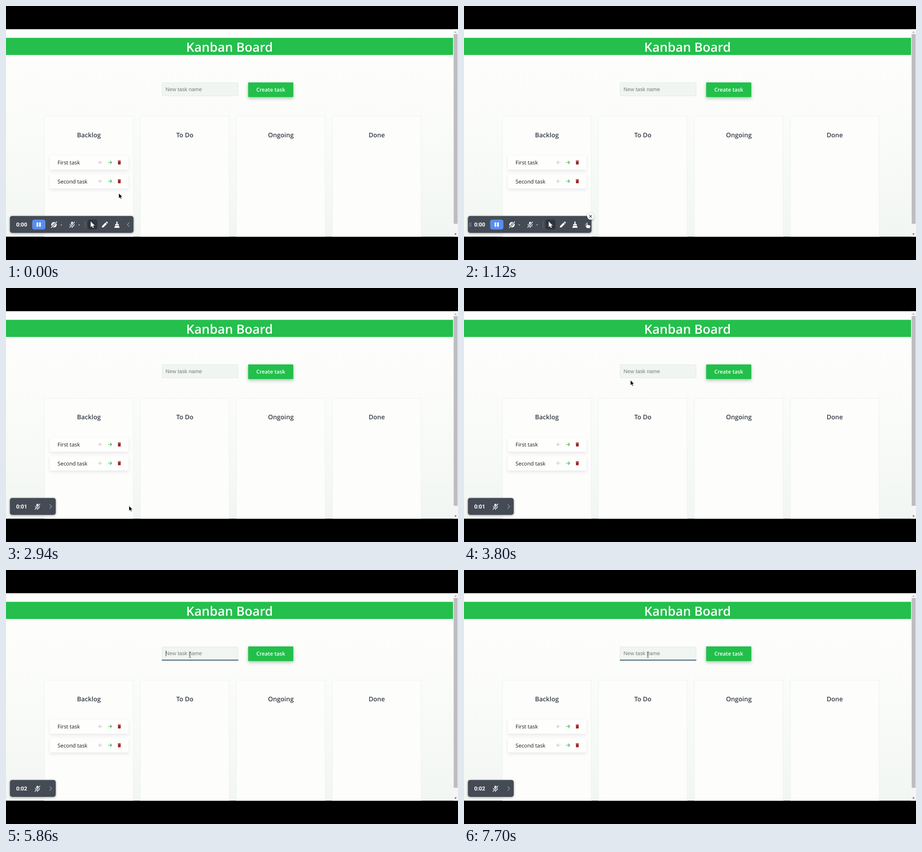
Write an HTML page that moves like this. It is 998x561 px and loops after 8 s.

```html
<!DOCTYPE html>
<html lang="en">
<head>
<meta charset="utf-8">
<title>Kanban Board</title>
<style>
  html, body { margin: 0; width: 100%; height: 100%; overflow: hidden; background: #000; }
  svg { display: block; }
  text { font-family: "Open Sans", sans-serif; text-rendering: geometricPrecision; }
  .middle { text-anchor: middle; font-weight: 600; }
  .title { font-size: 28px; fill: #fff; }
  .button { font-size: 11.67px; fill: #fff; }
  .heading { font-size: 14px; fill: #363c47; }
  .task { font-size: 11.8px; fill: #1c1c1c; }
  .placeholder { font: 11.7px "Liberation Sans", sans-serif; fill: #777c7b; }
  .timer { font: 600 12.2px Roboto, sans-serif; fill: #fff; }
  .line { fill: none; stroke-linecap: round; stroke-linejoin: round; }
</style>
</head>
<body>
<svg width="998" height="561" viewBox="0 0 998 561">
  <defs>
    <linearGradient id="page" x2="0" y2="1">
      <stop offset="0" stop-color="#fefffd"/>
      <stop offset=".35" stop-color="#fcfdfa"/>
      <stop offset="1" stop-color="#f2f6f3"/>
    </linearGradient>
    <filter id="cardShadow" x="-10%" y="-40%" width="120%" height="200%">
      <feDropShadow dx="0" dy="3" stdDeviation="3" flood-color="#505078" flood-opacity=".12"/>
    </filter>
    <filter id="buttonShadow" x="-20%" y="-40%" width="140%" height="200%">
      <feDropShadow dx="0" dy="3" stdDeviation="3.5" flood-color="#164a28" flood-opacity=".32"/>
    </filter>
    <filter id="barShadow" x="-10%" y="-30%" width="120%" height="170%">
      <feDropShadow dx="0" dy="1" stdDeviation="2" flood-opacity=".4"/>
    </filter>
    <clipPath id="screen"><rect y="51.3" width="998" height="458.2"/></clipPath>

    <g id="arrow" class="line" stroke-width="1.1">
      <path d="M-3.5 0H4M.7-3.3L4 0 .7 3.3"/>
    </g>
    <g id="trash" fill="#9c2226">
      <path d="M-3.5-4H-1.5L-1-4.6H1L1.5-4H3.5V-2.8H-3.5ZM-3-2.2H3V3.7Q3 4.6 2.1 4.6H-2.1Q-3 4.6-3 3.7Z"/>
    </g>
    <g id="camOff">
      <circle r="6" fill="#fff"/>
      <circle r="2.4" fill="#454b54"/>
      <path class="line" stroke="#454b54" stroke-width="3.4" d="M6-6.5L-6 6.5"/>
      <path class="line" stroke="#fff" stroke-width="1.4" d="M6-6.5L-6 6.5"/>
    </g>
    <g id="micOff">
      <rect x="-2.3" y="-6.5" width="4.6" height="8.5" rx="2.3" fill="#fff"/>
      <path class="line" stroke="#fff" stroke-width="1.3" d="M-4.5-1Q-4.5 4 0 4T4.5-1M0 4V6.5"/>
      <path class="line" stroke="#454b54" stroke-width="3" d="M5.5-6L-5.5 6"/>
      <path class="line" stroke="#fff" stroke-width="1.3" d="M5.5-6L-5.5 6"/>
    </g>
    <path id="caretDown" fill="#a9adb3" d="M-2.3-1H2.3L0 1.7Z"/>
  </defs>

  <g clip-path="url(#screen)">
    <rect y="51" width="998" height="459" fill="url(#page)"/>
    <rect y="70.3" width="987" height="37.9" fill="#24bf4c"/>
    <text class="middle title" x="493.5" y="100.5">Kanban Board</text>

    <rect x="344.5" y="169.5" width="168" height="29" rx="1" fill="#f0f5f2" stroke="#e1eae6"/>
    <text class="placeholder" x="352.3" y="188">New task name</text>
    <g id="focus">
      <path d="M344 199.2H513" stroke="#264b60" stroke-width="1.8"/>
      <path id="textCaret" d="M353.3 178V190.5" stroke="#222"/>
    </g>
    <rect x="534.6" y="168.8" width="99.8" height="32.4" rx="1.5" fill="#24bf4c" filter="url(#buttonShadow)"/>
    <text class="middle button" x="584.5" y="189">Create task</text>

    <g id="board"></g>

    <rect x="987" y="51" width="11" height="459" fill="#f5f5f6"/>
    <rect x="988.5" y="62" width="8.5" height="419" fill="#bdbdc1"/>
    <path d="M990 59L992.5 56 995 59Z" fill="#a3a3a3"/>
    <path d="M990 502.5L992.5 505.5 995 502.5Z" fill="#505050"/>

    <rect id="bar" x="8.6" y="463.8" height="37.2" rx="5" fill="#454b54" filter="url(#barShadow)"/>
    <text id="timer" class="timer" x="22.4" y="486.6"></text>
    <g id="wideTools">
      <rect x="57.7" y="471.7" width="29.3" height="22" rx="5" fill="#588df0"/>
      <path fill="#fff" d="M67.5 478h3.6v9.5h-3.6zM73.2 478h3.6v9.5h-3.6z"/>
      <use href="#camOff" x="106" y="483"/>
      <use href="#caretDown" x="122" y="483.5"/>
      <use href="#micOff" x="146" y="483"/>
      <use href="#caretDown" x="161.5" y="483.5"/>
      <path d="M174.5 475V490" stroke="#6a7078"/>
      <rect x="180" y="471.5" width="22" height="22" rx="5" fill="#30353c"/>
      <path fill="#fff" d="M187 476V488.3L189.8 485.7 191.8 490 193.8 489 191.9 484.9H196Z"/>
      <path fill="#fff" d="M211.5 489.5L212.3 485.7 219.7 478.3 222.7 481.3 215.3 488.7ZM220.6 477.4L221.8 476.3Q222.4 475.8 223 476.3L224.7 478Q225.2 478.6 224.7 479.2L223.6 480.4Z"/>
      <path fill="#fff" d="M243.8 476H246.2V481.5H249V484.2H241V481.5H243.8ZM240.7 485.2H249.3L250.8 490H247.7L247 487.5V490H239.2Z"/>
      <path class="line" stroke="#8e949b" stroke-width="1.4" d="M271.8 478.5L267.8 482.7 271.8 487"/>
      <g id="hoverTools">
        <path d="M12.5 478V487.5M15.3 478V487.5" stroke="#8e949b"/>
        <circle cx="279.5" cy="464.5" r="7.6" fill="#fff" filter="url(#barShadow)"/>
        <path class="line" stroke="#333" stroke-width="1.2" d="M276.8 461.8L282.2 467.2M282.2 461.8L276.8 467.2"/>
      </g>
    </g>
    <g id="smallTools">
      <use href="#micOff" x="69.5" y="483"/>
      <path class="line" stroke="#8e949b" stroke-width="1.4" d="M96.8 478.5L100.8 482.7 96.8 487"/>
    </g>

    <g id="pointer">
      <path id="arrowCursor" fill="#000" stroke="#fff" stroke-width=".8" d="M0 0V11.5L2.7 9.1 4.5 13 6.4 12.1 4.7 8.3H8.3Z"/>
      <path id="handCursor" fill="#fff" stroke="#222" stroke-width=".7" d="M-1.4 1Q0-1 1.3 1V5L7 6.3Q8 6.8 7.9 8L7 13H0L-4 8Q-4 6.5-2.8 6.7L-1.4 8Z"/>
      <path id="textCursor" class="line" stroke="#555" d="M-2-6.3Q0-6.3 0-5 0-6.3 2-6.3M0-5V5M-2 6.3Q0 6.3 0 5 0 6.3 2 6.3M-1 2H1"/>
    </g>
  </g>
</svg>
<script>
const LOOP = 8000;
const HOVER = 620, HAND = 840, COLLAPSE = 2380, TEXT = 4060, FOCUS = 5740;
const TICKS = [2660, 5460];
const BLINK = 1380;
const COLUMN_STEP = 211.9;

// Pointer hot spot: time, x, y
const PATH = [
  [0, 249, 413.5], [400, 249, 413.5], [1000, 271.5, 478], [1420, 271.5, 478],
  [1820, 271.5, 481], [3220, 271.5, 481], [3800, 367.5, 203.5], [4340, 406, 187]
];

const $ = id => document.getElementById(id);
const show = (id, visible) => { $(id).style.display = visible ? "" : "none"; };

const column = (name, i) => `
  <rect x="${85 + COLUMN_STEP * i}" y="243.5" width="196" height="280" fill="#fdfdfb" stroke="#ecf3f0"/>
  <text class="middle heading" x="${183 + COLUMN_STEP * i}" y="290">${name}</text>`;

const taskCard = (name, y) => `
  <rect x="97" y="${y - 15}" width="173" height="31" rx="2" fill="#fefefc" filter="url(#cardShadow)"/>
  <text class="task" x="113.8" y="${y + 4.6}">${name}</text>
  <use href="#arrow" transform="translate(209 ${y}) scale(-1 1)" stroke="#bfc1c1"/>
  <use href="#arrow" x="229.3" y="${y}" stroke="#24b24a"/>
  <use href="#trash" x="250.2" y="${y}"/>`;

$("board").innerHTML = ["Backlog", "To Do", "Ongoing", "Done"].map(column).join("")
  + taskCard("First task", 345.5) + taskCard("Second task", 387);

function pointerAt(t) {
  const next = PATH.findIndex(point => point[0] > t);
  if (next < 0) return PATH.at(-1).slice(1);
  const [t0, x0, y0] = PATH[next - 1], [t1, x1, y1] = PATH[next];
  const p = (t - t0) / (t1 - t0), eased = p * p * (3 - 2 * p);
  return [x0 + (x1 - x0) * eased, y0 + (y1 - y0) * eased];
}

function draw() {
  const t = performance.now() % LOOP;
  const collapsed = t >= COLLAPSE;
  const hand = t >= HAND && !collapsed;
  const overText = t >= TEXT;

  $("timer").textContent = "0:0" + TICKS.filter(tick => t >= tick).length;
  $("bar").setAttribute("width", collapsed ? 101.2 : 272.9);
  show("wideTools", !collapsed);
  show("smallTools", collapsed);
  show("hoverTools", t >= HOVER);
  show("focus", t >= FOCUS);
  show("textCaret", Math.floor((t - FOCUS) / BLINK) % 2 === 0);
  show("handCursor", hand);
  show("textCursor", overText);
  show("arrowCursor", !hand && !overText);
  $("pointer").setAttribute("transform", `translate(${pointerAt(t)})`);
  requestAnimationFrame(draw);
}
draw();
</script>
</body>
</html>
```
